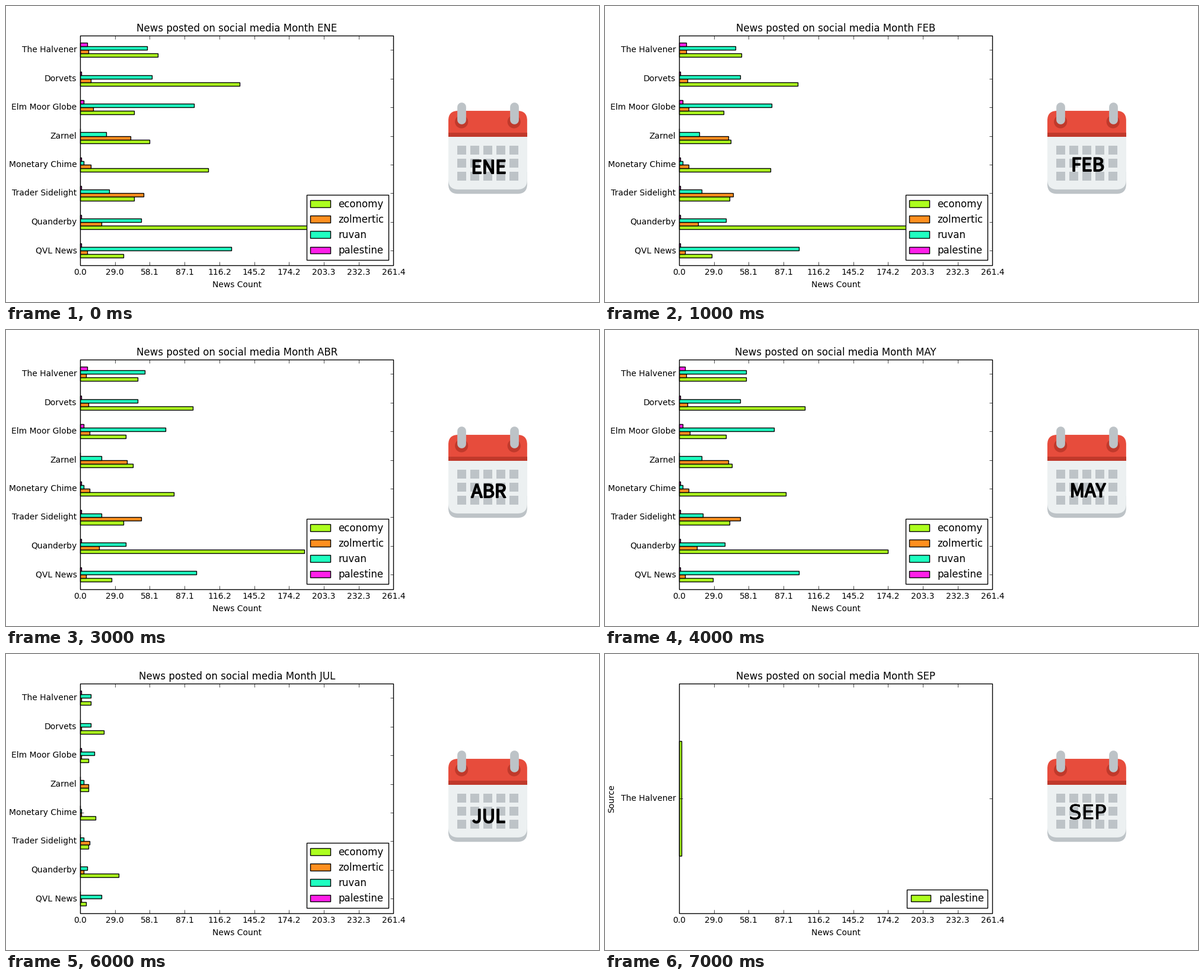
Recreate the animation shown at these times as a matplotlib script. Size 1000x500 px, loop 8 s.

```python
import matplotlib.pyplot as plt
import numpy as np
from matplotlib import patheffects
from matplotlib.animation import FuncAnimation
from matplotlib.patches import Circle, FancyBboxPatch, Rectangle

plt.rcParams["font.family"] = "DejaVu Sans"

PX = 0.72  # points per pixel at 100 dpi
LEFT, RIGHT, TOP, BOTTOM = 125, 653.4, 50, 437.55
X_MAX = 261.36
UNIT = (RIGHT - LEFT) / X_MAX

TOPICS = {"economy": "#adff1f", "zolmertic": "#ff8f1f",
          "ruvan": "#1fffc1", "palestine": "#ff1fe9"}

# Typical monthly count of each topic
SOURCES = {
    "The Halvener": (54, 6, 53, 6),
    "Dorvets": (107, 7, 50, 1),
    "Elm Moor Globe": (38, 9, 76, 3),
    "Zarnel": (46, 40, 18, 0),
    "Monetary Chime": (85, 8, 3, 1),
    "Trader Sidelight": (42, 49, 20, 1),
    "Quanderby": (181, 16, 40, 1),
    "QVL News": (30, 5, 104, 1),
}

# Baseline of each month's name on the calendar
MONTHS = {"ENE": 283, "FEB": 279, "MAR": 282, "ABR": 283,
          "MAY": 282, "JUN": 281, "JUL": 285, "SEP": 279}

fig = plt.figure(figsize=(10, 5), dpi=100, facecolor="white")
ax = fig.add_axes([0, 0, 1, 1])


def monthly_counts(month):
    """Typical counts with a busy first month, a short last one and some spread."""
    if month == "SEP":
        return {"The Halvener": [2]}
    pace = {"ENE": 1.17, "JUL": 0.17}.get(month, 0.96)
    rng = np.random.default_rng(list(MONTHS).index(month))
    return {source: np.round(np.array(typical) * pace * rng.uniform(0.9, 1.1, 4))
            for source, typical in SOURCES.items()}


def box(x, y, w, h, color, z, edge=1.0):
    ax.add_patch(Rectangle((x, y), w, h, facecolor=color, edgecolor="black",
                           linewidth=edge, zorder=z))


def label(x, y, text, size=10, ha="center", va="baseline", **kw):
    return ax.text(x, y, text, fontsize=size, ha=ha, va=va, zorder=8, **kw)


def tick(xs, ys):
    ax.plot(xs, ys, color="black", lw=0.5, zorder=3, solid_capstyle="butt")


def draw_axes():
    box(LEFT, TOP, RIGHT - LEFT, BOTTOM - TOP, "none", 4)
    for share in np.linspace(0, 1, 10):
        x = LEFT + (RIGHT - LEFT) * share
        tick([x, x], [TOP, TOP + 5.6])
        tick([x, x], [BOTTOM - 5.6, BOTTOM])
        label(x, BOTTOM + 5.56, f"{X_MAX * share:.1f}", va="top")
    label(389.5, 475.3, "News Count")


def draw_bars(counts):
    row = (BOTTOM - TOP) / len(counts)
    for i, (source, values) in enumerate(counts.items()):
        mid = TOP + row * (i + 0.5)
        thick = row * 0.5 / len(values)
        label(119.4, mid, source, ha="right", va="center")
        tick([LEFT, LEFT + 5.6], [mid, mid])
        tick([RIGHT - 5.6, RIGHT], [mid, mid])
        for k, (value, color) in enumerate(zip(values, TOPICS.values())):
            y = mid + row * 0.25 - thick * (k + 1)
            box(LEFT, y, value * UNIT, thick, color, 2)


def draw_legend(topics, left):
    bottom, step = 429.2, 26.2
    height = 31.4 + step * (len(topics) - 1)
    box(left, bottom - height, 645 - left, height, "white", 6)
    for k, (topic, color) in enumerate(zip(topics, TOPICS.values())):
        base = bottom - height + 20.4 + step * k
        box(left + 6.67, base - 11.67, 33.33, 11.67, color, 7)
        label(left + 53.9, base, topic, 12, "left")


def draw_calendar():
    u, x0, y0 = 7.38, 746, 162.3
    light, gray, red, dark = "#ecf0f1", "#bdc3c7", "#e74c3c", "#c0392b"

    def part(x, y, w, h, color):
        box(x0 + x * u, y0 + y * u, w * u, h * u, color, 1, 0)

    def rounded(y, h, color):
        style = f"round,pad=0,rounding_size={2.2 * u}"
        ax.add_patch(FancyBboxPatch((x0, y0 + y * u), 18 * u, h * u,
                                    boxstyle=style, facecolor=color, linewidth=0))

    rounded(10, 11, gray)
    rounded(2, 12, red)
    part(0, 8, 18, 8, light)
    rounded(12, 8, light)
    part(0, 7, 18, 1, dark)
    for x in (x0 + 3 * u, x0 + 15 * u):
        ax.add_patch(Circle((x, y0 + 4.5 * u), 1.5 * u, color=dark, lw=0))
        ax.plot([x, x], [y0 + u, y0 + 4 * u], color=gray, lw=2 * u * PX,
                solid_capstyle="round")
    for y in (10, 13, 16):
        for x in range(2, 17, 3):
            part(x, y, 2, 2, gray)


def draw_name(name, font, size, weight):
    text = label(814, MONTHS[name], name, size * PX, family=font)
    text.set_path_effects([patheffects.Stroke(linewidth=weight * PX,
                                              foreground="black"),
                           patheffects.Normal()])


def draw(frame):
    name = list(MONTHS)[frame]
    ax.clear()
    ax.set(xlim=(0, 1000), ylim=(500, 0))
    ax.axis("off")
    draw_axes()
    draw_calendar()
    draw_bars(monthly_counts(name))
    label(389.3, 43, f"News posted on social media Month {name}", 12)
    if name == "SEP":
        draw_legend(["palestine"], 509.4)
        label(15, 244.5, "Source", rotation=90, rotation_mode="anchor")
        draw_name(name, "DejaVu Sans", 34, 0.6)
    else:
        draw_legend(TOPICS, 506.7)
        draw_name(name, "Noto Sans CJK JP", 31, 1.9)
    return []


animation = FuncAnimation(fig, draw, frames=len(MONTHS), interval=1000,
                          init_func=lambda: draw(0), repeat=True, repeat_delay=0)
plt.show()
```
